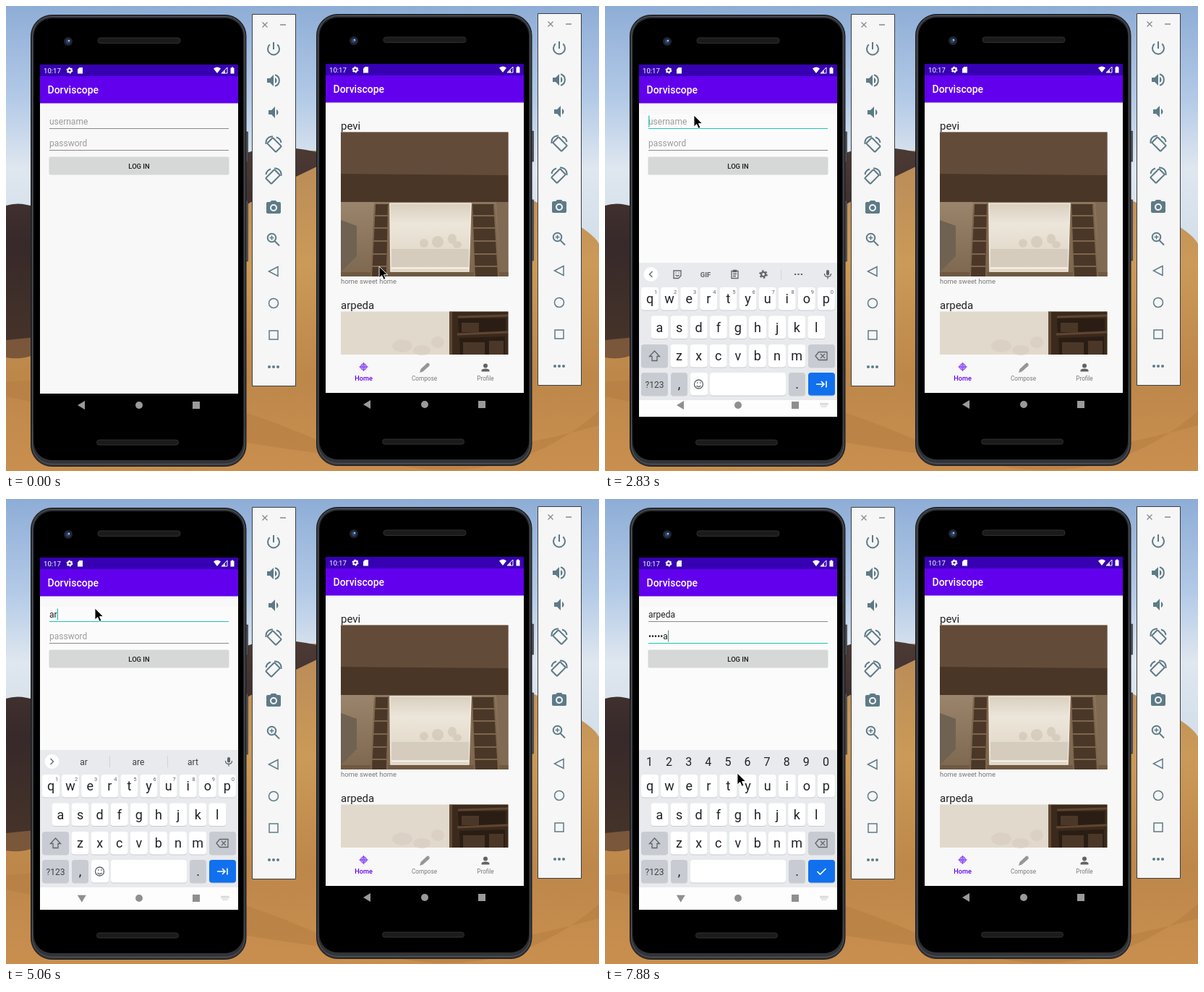
These frames come from a looping animation (820x643 px, 8000 ms). An HTML page:

```html
<!DOCTYPE html>
<html lang="en">
<head>
<meta charset="utf-8">
<title>Login on two phones</title>
<style>
  html, body { margin: 0; width: 100%; height: 100%; overflow: hidden; }
  svg { display: block; width: 820px; height: 643px; }
  text { font-family: Roboto, "Noto Sans", sans-serif; }
  .mid { text-anchor: middle; }
  .med { font-weight: 500; }
  .field { font-size: 12px; fill: #222; }
  .hint { font-size: 12px; fill: #9b9b9b; }
  .line { fill: none; stroke-width: 1.2; }
  .icon { fill: none; stroke: #5f6368; stroke-width: 1.3; }
  .letter { font-size: 18px; fill: #202124; }
  .digit { font-size: 16px; fill: #202124; }
  .sup { font-size: 7.5px; fill: #5f6368; }
  .word { font-size: 12px; fill: #3c4043; }
  .tool { fill: #5d7b87; }
  .tool .s { fill: none; stroke: #5d7b87; stroke-width: 2; }
  .tool .thin { stroke-width: 1.5; }
  .name { font-size: 15px; fill: #222; }
  .tab { font-size: 8.2px; fill: #7a7a7a; }
</style>
</head>
<body>
<svg viewBox="0 0 820 643">
  <defs>
    <linearGradient id="sky" x2="0" y2="1">
      <stop offset="0" stop-color="#8eadd6"/><stop offset=".2" stop-color="#b3cae7"/>
      <stop offset=".35" stop-color="#dfe7ef"/><stop offset=".5" stop-color="#d3dfea"/>
    </linearGradient>
    <linearGradient id="sand" x2="0" y2="1">
      <stop offset="0" stop-color="#b88a58"/><stop offset=".35" stop-color="#cb9a58"/>
      <stop offset=".7" stop-color="#bd874a"/><stop offset="1" stop-color="#c98f4f"/>
    </linearGradient>
    <linearGradient id="shade" x2="0" y2="1">
      <stop offset="0" stop-color="#4c3a34"/><stop offset=".5" stop-color="#37292a"/>
      <stop offset="1" stop-color="#453329"/>
    </linearGradient>
    <linearGradient id="rim" x2="0" y2="1">
      <stop offset="0" stop-color="#2a2c30"/><stop offset=".9" stop-color="#1e2023"/>
      <stop offset="1" stop-color="#34363a"/>
    </linearGradient>
    <linearGradient id="glass" x2="0" y2="1">
      <stop offset="0" stop-color="#d9cfbf"/><stop offset=".3" stop-color="#ece6da"/>
      <stop offset="1" stop-color="#ddd2c1"/>
    </linearGradient>
    <linearGradient id="wall" x2="0" y2="1">
      <stop offset="0" stop-color="#9a846c"/><stop offset="1" stop-color="#7d674f"/>
    </linearGradient>
    <clipPath id="screen"><path d="M47 81H321V568H47Z"/></clipPath>

    <g id="phone">
      <path d="M331 174h3.500v42H331zM331 269h3.500v84H331z" fill="#55585e" stroke="#2f3135" stroke-width=".7"/>
      <rect x="34.500" y="12.500" width="297.500" height="624" rx="29" fill="url(#rim)" stroke="#1c1d20"/>
      <rect x="36.500" y="14.500" width="293.500" height="619" rx="27" fill="none" stroke="#565a60"/>
      <rect x="38.500" y="17" width="289.500" height="611" rx="25" fill="#000"/>
      <rect x="127" y="44" width="114" height="7.500" rx="3.500" fill="#1b1b1b" stroke="#303030"/>
      <rect x="125.500" y="600" width="113" height="7" rx="3.500" fill="#1b1b1b" stroke="#303030"/>
      <circle cx="86" cy="49" r="6" fill="#22252c"/><circle cx="86" cy="49" r="3" fill="#29477c"/>
      <circle cx="87" cy="48" r="1.200" fill="#a9c3ec"/>
      <path d="M47 81H321V536H47Z" fill="#f8f8f8"/>
      <path d="M47 81H321V98H47Z" fill="#3700b3"/>
      <path d="M47 97H321V134.500H47Z" fill="#6200ee"/>
      <g fill="#fff">
        <text x="52" y="93" font-size="9.600">10:17</text>
        <circle cx="88" cy="89" r="2.600" fill="none" stroke="#fff" stroke-width="2"/>
        <circle cx="88" cy="89" r="3.800" fill="none" stroke="#fff" stroke-width="1.300" stroke-dasharray="2 1.980"/>
        <path d="M101.500 85H106V93.500H99V87.500Z"/>
        <path d="M287 86.500Q292 82.500 297 86.500L292 93Z"/>
        <path d="M306 85V93H298Z" fill="none" stroke="#fff"/><path d="M303 89V93H299Z"/>
        <path d="M312 84.500h2v1h1.500V93.500h-5V85.500H312z"/>
        <text class="med" x="57.500" y="121" font-size="14">Dorviscope</text>
      </g>
      <g fill="#9a9a9a">
        <path d="M99 552L109 546V558Z"/><circle cx="184" cy="552" r="5"/><path d="M258 547h10v10h-10z"/>
      </g>
    </g>

    <g id="tools" class="tool">
      <path d="M340.500 11.500H400.500V525.500H340.500Z" fill="#f6f6f6" stroke="#3b3d42"/>
      <path d="M354.500 22.500l7 7m0-7l-7 7M379 26h8" stroke="#818a90" stroke-width="1.300"/>
      <path class="s" d="M370 50V60M364.800 53.300A8 8 0 1 0 375.200 53.300"/>
      <g transform="translate(358 91)">
        <path d="M3 9v6h4l5 5V4L7 9H3zm13.500 3c0-1.770-1.020-3.290-2.500-4.030v8.050c1.480-.73 2.500-2.250 2.500-4.020z"/>
        <path class="s" d="M14 4.300A8 8 0 0 1 14 19.700"/>
      </g>
      <path transform="translate(358 135)" d="M18.500 12c0-1.770-1.020-3.290-2.500-4.030v8.050c1.480-.73 2.500-2.250 2.500-4.020zM5 9v6h4l5 5V4L9 9H5z"/>
      <g id="turn" class="s" transform="translate(370 191)">
        <rect x="-8.500" y="-5.500" width="17" height="11" rx="1" transform="translate(1 1) rotate(45)"/>
        <path d="M-10.500 0V-3Q-9.500-9.500-3-10.500L-1-10.500M4-9.500Q9.500-8 10.500-2"/>
      </g>
      <use href="#turn" transform="matrix(-1 0 0 1 740 44)"/>
      <path transform="translate(358 267)" fill-rule="evenodd" d="M9 2L7.200 4H4Q2 4 2 6V18Q2 20 4 20H20Q22 20 22 18V6Q22 4 20 4H16.800L15 2ZM12 7A5 5 0 1 1 12 17A5 5 0 1 1 12 7Z"/>
      <circle cx="370" cy="279" r="3"/>
      <path class="s" d="M371.500 325L378 331.500"/>
      <circle class="s" cx="367.500" cy="320.500" r="5.800"/>
      <path class="s thin" d="M364.500 320.500h6m-3-3v6"/>
      <path class="s thin" d="M363.500 367L376 360.500V373.500Z"/>
      <circle class="s thin" cx="370" cy="411" r="6.500"/>
      <path class="s thin" d="M364 449h12v12h-12z"/>
      <circle cx="364" cy="499" r="2"/><circle cx="370" cy="499" r="2"/><circle cx="376" cy="499" r="2"/>
    </g>

    <g id="mic" class="icon">
      <rect x="306" y="357" width="4" height="7.500" rx="2" fill="#5f6368" stroke="none"/>
      <path d="M303.500 362Q303.500 366.500 308 366.500T312.500 362M308 366.500V369.500"/>
    </g>
  </defs>

  <!-- desert wallpaper -->
  <path d="M0 0H820V643H0Z" fill="url(#sky)"/>
  <path d="M0 464L332 240L401 200H430Q640 225 735 272T820 337V643H0Z" fill="url(#sand)"/>
  <path d="M0 276Q18 270 40 278L330 204Q370 188 430 202V222L401 236L332 275L180 440L36 464H0Z" fill="url(#shade)"/>
  <path d="M0 462L40 458V482Q20 490 0 486Z" fill="#7a573a"/>
  <path d="M0 520Q200 500 430 600T820 560V580Q600 640 430 618T0 540Z" fill="#b37c40" opacity=".5"/>

  <use href="#phone"/>
  <use href="#phone" x="395" y="-1"/>
  <use href="#tools"/>
  <use href="#tools" x="395" y="-1"/>

  <!-- feed -->
  <g>
    <text class="name" x="463" y="171">pevi</text>
    <path d="M463 174.500H694.500V374H463Z" fill="url(#wall)"/>
    <path d="M463 174.500H694.500V234H463Z" fill="#624b39"/>
    <path d="M463 232L694.500 234V271H463Z" fill="#493627"/>
    <path d="M463 271H509L506 374H463Z" fill="url(#wall)"/>
    <path d="M463 296L485 304V346L463 368Z" fill="#6f6252"/>
    <path d="M678 271H694.500V374H685Z" fill="#806a53"/>
    <path d="M463 368H694.500V374H463Z" fill="#6f5942"/>
    <path d="M511 274H529L526 374H505ZM645 274H675L681 374H648Z" fill="#4a3727"/>
    <path d="M510 290h18M509 307h19M508 325h19M507 343h19M506 360h20M646 290h30M646 307h31M647 325h31M647 343h32M648 360h32" stroke="#7d664d" stroke-width="1.800"/>
    <path d="M510 275L505 374M529 275L527 374M644 275L648 374M675 275L681 374" stroke="#7d664d" stroke-width="2"/>
    <path d="M531 273H643L640 367H532Z" fill="url(#glass)" stroke="#f2ebdf" stroke-width="1.500"/>
    <path d="M533 336H640V361H533Z" fill="#d6ccbd"/>
    <path d="M533 361H640V364H533Z" fill="#f1eadf"/>
    <g fill="#cdc3b3" opacity=".6">
      <ellipse cx="578" cy="328" rx="6" ry="6"/><ellipse cx="597" cy="326" rx="8" ry="8"/>
      <ellipse cx="617" cy="322" rx="6" ry="7"/><ellipse cx="624" cy="330" rx="6" ry="5"/>
    </g>
    <text x="463" y="384" font-size="9.400" fill="#787878">home sweet home</text>

    <text class="name" x="463" y="419">arpeda</text>
    <path d="M463 422.500H694.500V482H463Z" fill="#e1d9cc"/>
    <g fill="#d6cdbf" opacity=".6">
      <ellipse cx="548" cy="470" rx="14" ry="9"/><ellipse cx="575" cy="476" rx="12" ry="7"/><ellipse cx="597" cy="465" rx="9" ry="8"/>
    </g>
    <path d="M613 422.500H694.500V482H613Z" fill="#3b291c"/>
    <path d="M613 423h4V482h-4z" fill="#5f4833"/>
    <path d="M625 432H691V449L626 452ZM627 459L690 457V482H628Z" fill="#2a1d14"/>
    <path d="M624 454L694 451M625 430L694 428" stroke="#5f4632" stroke-width="3"/>
    <path d="M630 438h24v13h-24zM632 465h30v17h-30zM668 463h20v19h-20z" fill="#4b3728"/>

    <g fill="none" stroke="#8b4bf0" stroke-width="1.400">
      <circle cx="494.500" cy="499" r="4"/><path d="M488.500 499h12m-6-6v12"/>
    </g>
    <circle cx="494.500" cy="499" r="2.800" fill="#9a62f3"/>
    <path d="M572 507L573.500 502L581.500 494.500Q583.500 492.500 585.500 495Q586.500 497 584.500 498.500L576.500 505.500Z" fill="#979797"/>
    <circle cx="663" cy="497.500" r="3" fill="#636363"/>
    <path d="M657.500 505.500V504Q657.500 501.500 663 501.500T668.500 504V505.500Z" fill="#636363"/>
    <text class="mid med" x="494.500" y="518" font-size="9.200" fill="#6200ee">Home</text>
    <text class="tab mid" x="578.500" y="518">Compose</text>
    <text class="tab mid" x="663" y="518">Profile</text>
  </g>

  <!-- login form -->
  <path id="lit" d="M47 149H321V400H47Z" fill="#fbfbfb"/>
  <text id="userHint" class="hint" x="60" y="164">username</text>
  <text id="passHint" class="hint" x="60" y="194">password</text>
  <text id="user" class="field" x="60" y="164"></text>
  <text id="pass" class="field" x="60" y="194"></text>
  <path id="userLine" class="line" d="M60 169.500H308"/>
  <path id="passLine" class="line" d="M60 199.500H308"/>
  <path id="caret" class="line" d="M.8 0V16"/>
  <rect x="59.500" y="208.500" width="249" height="25" rx="2" fill="#d6d7d7"/>
  <text class="mid med" x="184" y="224.500" font-size="9.400" fill="#1c1c1c">LOG IN</text>

  <g id="keyboard" clip-path="url(#screen)">
    <g id="panel">
      <path d="M47 347H321V537H47Z" fill="#e8eaed"/>
      <path d="M47 537H321V640H47Z" fill="#fdfdfd"/>
      <g id="keys"></g>
      <g id="bar">
        <circle cx="63.500" cy="363" r="10" fill="#fff"/>
        <path id="chevron" class="icon" d="M65.500 359L61.500 363L65.500 367"/>
        <use href="#mic"/>
        <g id="menu" class="icon">
          <path d="M95 358h10v7l-3.500 3.500H95zM97.500 364q2.500 2.500 5 0M97.500 361h1m3 0h1"/>
          <text class="mid" x="139" y="366.500" font-size="9.500" font-weight="700" fill="#5f6368" stroke="none">GIF</text>
          <path d="M175 358.500h9v10h-9zM177.500 357.500h4v2h-4zM177 362.500h5m-5 3h4"/>
          <circle cx="219" cy="363" r="3" stroke-width="2.200"/>
          <circle cx="219" cy="363" r="5" stroke-width="1.600" stroke-dasharray="2.600 2.636"/>
          <path d="M243.500 356v14" stroke="#d3d6da" stroke-width="1"/>
          <path d="M262 363h2.200m2.200 0h2.200m2.200 0h2.200" stroke-width="2.200"/>
        </g>
        <g id="words">
          <path d="M143.500 355v16M223.500 355v16" stroke="#d0d3d7"/>
          <text id="word0" class="word mid" x="107.500" y="367.500"></text>
          <text id="word1" class="word mid" x="183" y="367.500"></text>
          <text id="word2" class="word mid" x="258.500" y="367.500"></text>
          <g id="face">
            <path d="M178 370Q183 365 188 370Z" fill="#5aa5dd"/>
            <circle cx="183" cy="363.500" r="4.700" fill="#f5c344"/>
            <path d="M178.300 363Q179 358.500 183 358.500T187.700 363Q183 359 178.300 363Z" fill="#9a6130"/>
            <ellipse cx="183" cy="358" rx="4" ry="1.300" fill="none" stroke="#4a9ad4"/>
            <path d="M181 363.500h.8m2.500 0h.8M181.500 366q1.500 1 3 0" fill="none" stroke="#6b4420" stroke-width=".8"/>
          </g>
        </g>
      </g>
      <g id="digits"></g>
    </g>
    <g fill="#8f8f8f">
      <path id="back" d="M99 552L109 546V558Z"/>
      <circle cx="184" cy="552" r="5"/><path d="M258 547h10v10h-10z"/>
      <path d="M297.500 549.500h11m-11 2h11m-9 2.500h7" fill="none" stroke="#a5a5a5" stroke-dasharray="1.300 .7"/>
    </g>
  </g>

  <path id="pointer" d="M0 0V16L3.700 12.600L6.300 18.300L8.900 17.200L6.500 11.600H11.500Z" fill="#000" stroke="#fff" stroke-width=".9"/>
</svg>

<script>
const $ = id => document.getElementById(id);
const show = (id, on) => $(id).style.display = on ? '' : 'none';
const LOOP = 8000, PITCH = 27.1, TEAL = '#1fc3b4', GREY = '#8a8a8a';
const NAME = 'arpeda';

// keyboard
const key = (x, y, w, fill = '#fff') =>
  `<rect x="${x}" y="${y + 1}" width="${w}" height="31.500" rx="4" fill="#c9cbcf"/>` +
  `<rect x="${x}" y="${y}" width="${w}" height="31.500" rx="4" fill="${fill}"/>`;
const label = (s, x, y, cls) => `<text class="mid ${cls}" x="${x}" y="${y}">${s}</text>`;
const row = (s, x0, y) => [...s].map((c, i) =>
  key(x0 + i * PITCH - 12, y, 24) + label(c, x0 + i * PITCH, y + 22, 'letter')).join('');
const number = i => (i + 1) % 10;
const eachDigit = f => Array.from({ length: 10 }, (_, i) => f(i)).join('');
const DIM = '#c8ccd2';

$('keys').innerHTML =
  row('qwertyuiop', 62, 381) + row('asdfghjkl', 75.5, 420.5) + row('zxcvbnm', 102.5, 460) +
  key(50, 460, 37, DIM) + key(281, 460, 37, DIM) +
  key(50, 499, 37, DIM) + key(91, 499, 23, DIM) + key(254, 499, 23, DIM) + key(281, 499, 37, '#1170ee') +
  label('?123', 68.5, 519.5, 'word') + label(',', 102.5, 521, 'letter') + label('.', 265.5, 521, 'letter') +
  `<g class="icon">
    <path d="M68.500 469L75.500 476.500H72V482.500H65V476.500H61.500Z"/>
    <path d="M291 476L295.500 470.500H307V481.500H295.500ZM298 473l6 6m0-6l-6 6"/>
  </g>
  <g id="textKeys">
    ${key(118, 499, 24)}${key(145, 499, 105)}
    <g class="icon"><circle cx="129.500" cy="515" r="6"/><path d="M126.500 517q3 3 6 0M127 513h1.500m2.500 0h1.500"/></g>
    <path d="M292 515h11m-4-4l4 4l-4 4M306 510.500v9" class="icon" style="stroke:#fff;stroke-width:1.600"/>
    ${eachDigit(i => label(number(i), 70 + i * PITCH, 389.5, 'sup'))}
  </g>
  <g id="passKeys">
    ${key(118, 499, 132)}
    <path d="M293.500 515l4 4l8-8" class="icon" style="stroke:#fff;stroke-width:1.700"/>
  </g>`;
$('digits').innerHTML = eachDigit(i => label(number(i), 61.5 + i * PITCH, 369, 'digit'));

// timelines: [start in ms, ...values], each held until the next
const pointer = [
  [0, 516, 360], [1350, 446, 350], [1500, 250, 319], [1650, 198, 312],
  [1940, 188, 290], [2090, 143, 186], [2240, 123, 151],
  [5800, 117, 168], [5950, 114, 178], [6100, 113, 182],
  [7580, 122, 204], [7730, 156, 312], [7880, 183, 379]
];
const panel = [[0, 200, 0], [2530, 64, .5], [2680, 26, 1], [2830, 8, 1], [2980, 0, 1]];
const back = [[0, 0], [2980, -60], [3130, -90]];
const caretOn = [[0, 0], [2390, 1], [2980, 0], [3570, 1], [4020, 0], [4470, 1]];
const userLength = [[0, 0], [4770, 1], [5060, 2], [5210, 3], [5360, 4], [5500, 5], [5650, 6]];
const passLength = [[0, 0], [6690, 1], [6840, 2], [6990, 3], [7140, 4], [7580, 5], [7730, 6]];
const words = [
  [0, '', '', ''], [5060, 'ar', 'are', 'art'], [5210, 'arp', 'are', 'art'], [5500, 'arped', '', NAME]
];
const at = (list, t) => list.findLast(step => step[0] <= t).slice(1);

function draw(t) {
  const [px, py] = at(pointer, t);
  $('pointer').setAttribute('transform', `translate(${px} ${py})`);

  const [drop, alpha] = at(panel, t);
  $('panel').setAttribute('transform', `translate(0 ${drop})`);
  $('keyboard').style.opacity = alpha;
  $('back').setAttribute('transform', `rotate(${at(back, t)} 104.800 552)`);
  show('lit', t >= 2830);

  const [n] = at(userLength, t), [m] = at(passLength, t);
  $('user').textContent = NAME.slice(0, n);
  $('pass').textContent = m ? '•'.repeat(m - 1) + NAME[m - 1] : '';
  show('userHint', !n);
  show('passHint', !m);

  const inPass = t >= 6240;
  $('userLine').style.stroke = t >= 2390 && !inPass ? TEAL : GREY;
  $('passLine').style.stroke = inPass ? TEAL : GREY;
  const x = 60 + $(inPass ? 'pass' : 'user').getComputedTextLength();
  $('caret').setAttribute('transform', `translate(${x} ${inPass ? 181.5 : 151.5})`);
  $('caret').style.stroke = t >= 7880 ? '#6d8f8c' : TEAL;
  show('caret', at(caretOn, t)[0]);

  const numeric = t >= 6390, suggest = t >= 5060;
  show('bar', !numeric);
  show('digits', numeric);
  show('textKeys', !numeric);
  show('passKeys', numeric);
  show('menu', !suggest);
  show('words', suggest);
  show('face', t >= 5500);
  at(words, t).forEach((w, i) => $('word' + i).textContent = w);
  $('chevron').setAttribute('transform', suggest ? 'rotate(180 63.500 363)' : '');
}

const start = performance.now();
function tick() {
  draw((performance.now() - start) % LOOP);
  requestAnimationFrame(tick);
}
tick();
</script>
</body>
</html>
```
